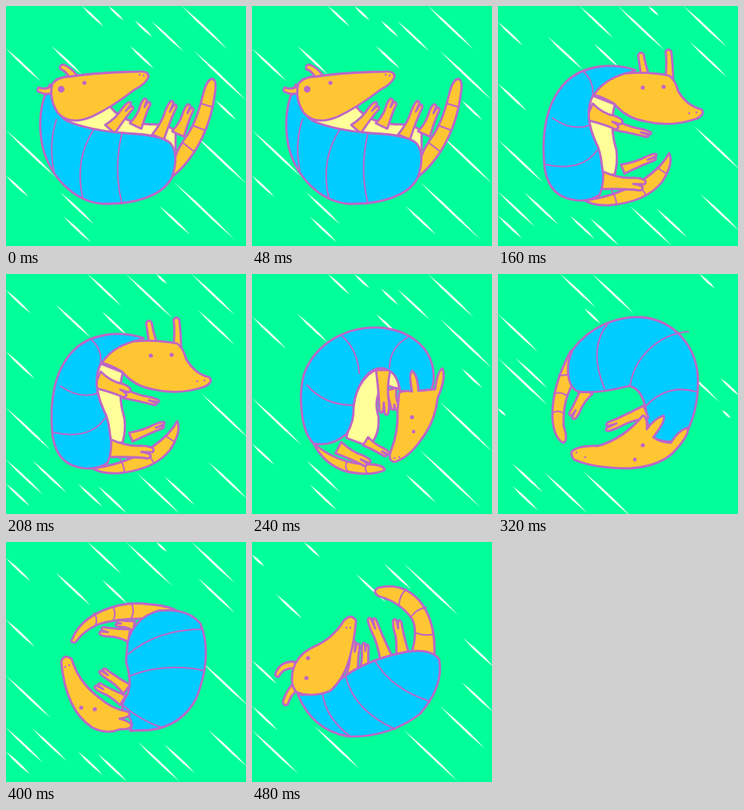
Animation of 300 by 300 pixels, one loop 560 ms. Source, as an HTML page:

```html
<!DOCTYPE html>
<html lang="en">
<head>
<meta charset="utf-8">
<title>Rolling armadillo</title>
<style>
  html, body { margin: 0; width: 100%; height: 100%; overflow: hidden; background: #00ff99; }
  svg { display: block; width: 100vw; height: 100vh; }
  path { stroke: #bd66c8; stroke-width: 2.8; stroke-linejoin: round; stroke-linecap: round; }
  .skin { fill: #ffc633; }
  .shell { fill: #00ccff; }
  .belly { fill: #ffff99; }
  .line { fill: none; stroke-width: 2; }
  .rain { fill: #fff; stroke: none; }
  circle { fill: #bd66c8; }
</style>
</head>
<body>
<svg id="stage" viewBox="0 0 300 300"></svg>
<script>
const STEP = 80;
const stage = document.getElementById('stage');
const poses = [];
let art = [];

const shape = (kind, d, place = '') => art.push(`<path class="${kind}" d="${d}" transform="${place}"/>`);
const skin = d => shape('skin', d);
const shell = d => shape('shell', d);
const belly = d => shape('belly', d);
const line = d => shape('line', d);
const dot = (x, y, r = 2.6) => art.push(`<circle cx="${x}" cy="${y}" r="${r}"/>`);
const nostrils = (x, y, dx, dy) => { dot(x, y, 1.2); dot(x + dx, y + dy, 1.2); };

// Draws a part along the line from its root to its tip
function along(x, y, tipX, tipY, outline) {
  const dx = tipX - x, dy = tipY - y;
  shape('skin', outline(Math.hypot(dx, dy)), `translate(${x} ${y}) rotate(${Math.atan2(dy, dx) * 180 / Math.PI})`);
}

// A leg ending in two toes
const limb = (x, y, tipX, tipY, w = 8) => along(x, y, tipX, tipY, n =>
  `M0 ${-w}Q${n * .4} ${-w * .4} ${n * .72} ${-w * .7}Q${n * 1.1} ${-w * .8} ${n} ${-w * .1}L${n * .74} 0` +
  `Q${n * 1.08} ${w * .1} ${n * .92} ${w * .65}Q${n * .6} ${w * .6} 0 ${w}Z`);

const ear = (x, y, tipX, tipY, bend = 0) => along(x, y, tipX, tipY, n =>
  `M0 -5Q${n * .5} ${bend - 4} ${n - 3} -3.5Q${n + 2} 0 ${n - 3} 3.5Q${n * .5} ${bend + 3} 0 5Z`);

// A thin sliver falling to the lower right
function streak([x, y, n]) {
  const at = (k, side) => `${x + n * k + side} ${y + n * k * .95 - side}`;
  return `M${at(0, 0)}L${at(.35, .9)} ${at(.7, .9)} ${at(1, 0)} ${at(.65, -.9)} ${at(.3, -.9)}Z`;
}
const streaks = list => list.split(',').map(s => streak(s.trim().split(' ').map(Number))).join('');

function pose(rain) {
  art = [];
  poses.push(art);
  shape('rain', rain);
}

const rainA = streaks('95 0 27, 128 0 19, 161 18 22, 182 19 40, 220 0 57, 0 53 43, 57 50 38, 155 50 30, ' +
  '235 56 66, 262 118 26, 235 160 66, 0 155 62, 0 212 28, 68 233 42, 72 263 34, 192 250 38, 210 220 76');
const rainB = streaks('78 0 44, 118 0 52, 108 43 20, 252 0 19, 0 50 50, 22 105 40, 0 105 62, 0 168 10, ' +
  '222 108 55, 278 130 24, 280 170 11, 58 248 54, 107 247 60, 18 237 38, 18 265 32');
const rainC = streaks('0 20 31, 62 38 44, 102 0 42, 120 47 32, 150 0 58, 188 0 13, 232 0 54, 240 45 46, ' +
  '0 97 36, 245 150 58, 0 167 56, 33 233 43, 0 232 46, 0 262 30, 90 262 31, 115 265 36, 165 250 52, ' +
  '198 253 38, 253 235 48');
const rainD = streaks('65 0 20, 0 16 15, 30 65 33, 130 40 38, 165 27 34, 190 27 68, 264 120 38, ' +
  '262 175 40, 0 148 31, 0 205 32, 0 235 58, 78 230 56, 235 205 56, 190 235 67');

// On its back
pose(rainA);
skin('M207 214Q207 190 222 168C236 150 242 128 247 108Q251 92 258 91Q264 93 261 110C257 145 240 188 207 214Z');
line('M244 122L257 126M235 150L248 155M221 171L234 181');
belly('M70 144Q108 136 128 122Q142 146 180 148Q205 147 212 158V180Z');
limb(130, 154, 157, 123);
limb(162, 150, 177, 118);
limb(215, 160, 231, 125);
limb(190, 164, 210, 121);
shell('M55 98C42 120 40 150 46 177C56 215 85 243 118 247C158 249 195 238 207 215Q217 187 206 172Q195 161 150 159Q100 155 75 143Q58 130 55 98Z');
line('M63 142Q53 172 60 207M110 154Q85 192 96 240M145 159Q134 203 145 247');
ear(66, 96, 39, 106, -10);
ear(85, 90, 68, 74, 4);
skin('M58 97Q65 88 82 88Q115 83 166 82Q179 81 178 89Q174 98 160 105Q133 126 108 138Q80 150 65 134Q53 116 58 97Z');
dot(69, 104, 4.2);
dot(98, 96);
nostrils(172, 87, -5, -1);

// Sitting up
pose(rainB);
skin('M146 214Q195 206 229 166Q234 180 220 197Q190 227 144 241Z');
line('M166 210Q165 220 172 229M188 201L195 214M208 187L217 197');
belly('M98 112H128Q130 130 126 151Q138 176 160 186Q165 200 160 215H145L118 180Z');
limb(130, 149, 177, 148);
limb(99, 133, 154, 137, 10);
limb(150, 204, 193, 182);
limb(135, 199, 168, 173);
shell('M106 76C80 80 58 105 54 140C50 180 58 220 85 238C105 247 130 246 143 237Q150 222 143 205Q135 190 118 180C100 165 96 140 98 112Z');
line('M99 121Q78 128 60 157M117 166Q85 173 68 203');
ear(120, 66, 108, 44, 2);
ear(151, 60, 138, 37, -2);
skin('M98 112C101 86 109 64 122 57Q142 50 160 57Q198 72 228 81Q234 87 224 96Q190 113 145 115Q115 117 98 112Z');
dot(130, 76, 4.2);
dot(161, 69);
nostrils(214, 86, 9, -1);

// Leaning forward
pose(rainC);
skin('M108 243Q150 238 183 216Q205 201 214 184Q220 197 205 220Q185 245 140 249Q120 250 108 243Z');
line('M142 230Q148 240 148 248M175 222L185 236M199 202L211 210');
belly('M118 112L146 123Q139 150 148 180Q150 195 146 210L131 214L122 170C113 150 110 130 118 112Z');
limb(146, 149, 190, 161, 6);
limb(114, 132, 153, 149, 11);
limb(156, 204, 198, 188, 6);
limb(130, 218, 183, 224, 11);
shell('M172 80C140 70 105 75 85 95C60 120 54 160 58 200Q62 232 85 240Q110 248 127 236Q134 220 130 200Q128 180 122 170C113 150 110 130 118 113Q135 95 172 80Z');
line('M107 82Q121 96 118 113M68 140Q92 157 115 149M59 198Q105 208 124 180');
ear(184, 88, 178, 58);
ear(214, 92, 213, 54, 2);
skin('M120 111Q132 92 160 84Q190 82 214 87Q222 93 225 106Q236 125 254 129Q260 135 248 141Q215 152 183 144Q160 140 145 122Q132 114 120 111Z');
dot(181, 102);
dot(207, 101);
nostrils(239, 134, 9, -1);

// Nose to the ground
pose(rainA);
skin('M77 212Q110 239 150 238Q165 239 166 245Q150 253 118 247Q90 238 77 212Z');
line('M119 234Q115 241 120 247M143 238Q140 243 144 249');
belly('M127 165C130 140 145 118 165 118Q182 122 184 144L165 138Q151 155 158 178Q160 204 145 215L118 205Z');
limb(142, 209, 170, 226, 6);
limb(108, 217, 146, 237);
limb(174, 144, 179, 170, 7);
limb(164, 120, 165, 175, 9);
shell('M77 212C60 195 58 150 65 125C80 85 120 65 160 67C195 70 225 90 227 125Q228 140 222 148L185 146Q182 122 165 118C145 115 130 140 127 165Q128 185 118 200Q100 216 77 212Z');
line('M113 78Q132 95 134 124M69 139Q90 164 127 164M195 79Q172 92 172 117');
skin('M184 148Q193 145 200 147Q196 124 200 121Q207 126 208 146L229 144Q232 121 238 118Q243 130 232 155Q229 185 210 209Q195 230 178 235Q169 233 174 220Q183 198 182 170Z');
dot(200, 179);
dot(202, 197, 2.2);
nostrils(178, 230, 6, -1);

// Tumbling over the head
pose(rainB);
skin('M91 96Q67 140 68 180Q70 206 82 211Q88 207 82 190Q81 160 92 140Q86 120 91 96Z');
line('M76 127L88 126M70 150Q77 146 86 152M68 174Q74 169 82 174');
limb(111, 146, 92, 179);
shell('M93 95C115 65 150 52 180 54C220 58 250 90 250 135Q250 175 231 207Q212 213 195 205Q185 190 185 170Q180 143 164 140Q125 150 100 147Q85 140 88 110Z');
line('M138 61Q112 92 133 143M238 72C200 75 170 105 165 140M248 147Q211 137 185 165');
limb(185, 172, 135, 192);
skin('M92 222Q100 214 125 215Q157 206 181 177Q187 178 186 194Q195 181 207 177Q210 184 194 204Q203 211 216 211Q225 196 237 192Q240 200 222 220Q205 240 165 243Q120 243 95 232Q91 227 92 222Z');
dot(181, 214);
dot(171, 232, 2.4);
nostrils(98, 223, 11, 6);

// Upside down
pose(rainC);
skin('M83 121C95 90 140 72 180 78Q205 80 215 87L175 96Q140 95 115 103Q97 111 87 125Q79 127 83 121Z');
line('M110 89Q115 95 112 104M134 81Q138 90 134 98M157 77Q161 86 157 95');
limb(160, 105, 138, 101, 6);
limb(154, 117, 118, 111);
shell('M152 125Q160 95 190 86Q227 82 243 102C255 130 250 165 238 195Q220 230 180 235L155 236Q162 224 146 210Q143 204 152 190Q158 175 150 150Z');
line('M153 140Q190 109 246 109M153 168Q200 150 248 161M146 204Q168 223 195 232');
limb(151, 184, 119, 160, 7);
limb(146, 198, 113, 179, 7);
skin('M69 150Q72 139 82 146Q91 176 117 195Q133 209 152 212Q160 218 142 221Q157 225 157 230Q154 235 143 234Q126 241 108 232Q75 211 69 150Z');
dot(94, 207);
dot(111, 209);
nostrils(74, 156, 5, -2);

// Coming round onto its back
pose(rainD);
skin('M199 140Q208 112 200 96Q185 75 159 68Q149 62 158 57Q188 50 209 73Q230 98 228 142Z');
line('M193 59Q184 67 184 78M218 82Q207 83 200 92M227 115Q217 118 206 114');
limb(168, 146, 149, 95);
limb(188, 140, 181, 97);
limb(140, 162, 142, 127, 6);
limb(124, 172, 130, 125);
shell('M57 190C72 195 100 180 120 165Q150 145 195 137Q225 133 234 147Q240 180 210 215Q170 245 120 243Q75 235 57 190Z');
line('M88 189Q92 220 123 243M117 168Q128 211 179 234M154 149Q175 184 222 199');
ear(55, 154, 29, 167, 10);
ear(55, 180, 40, 204, 4);
skin('M50 168Q52 143 77 131Q101 121 115 98Q124 89 130 98Q128 124 122 145Q115 171 98 186Q75 195 56 188Q49 181 50 168Z');
dot(70, 145);
dot(68, 170);
nostrils(118, 107, 5, 0);

stage.innerHTML = poses.map(p => `<g visibility="hidden">${p.join('')}</g>`).join('');
const groups = [...stage.children];
const start = performance.now();

function draw() {
  const now = Math.floor((performance.now() - start) / STEP) % groups.length;
  groups.forEach((g, i) => g.setAttribute('visibility', i === now ? 'visible' : 'hidden'));
  requestAnimationFrame(draw);
}
draw();
</script>
</body>
</html>
```
